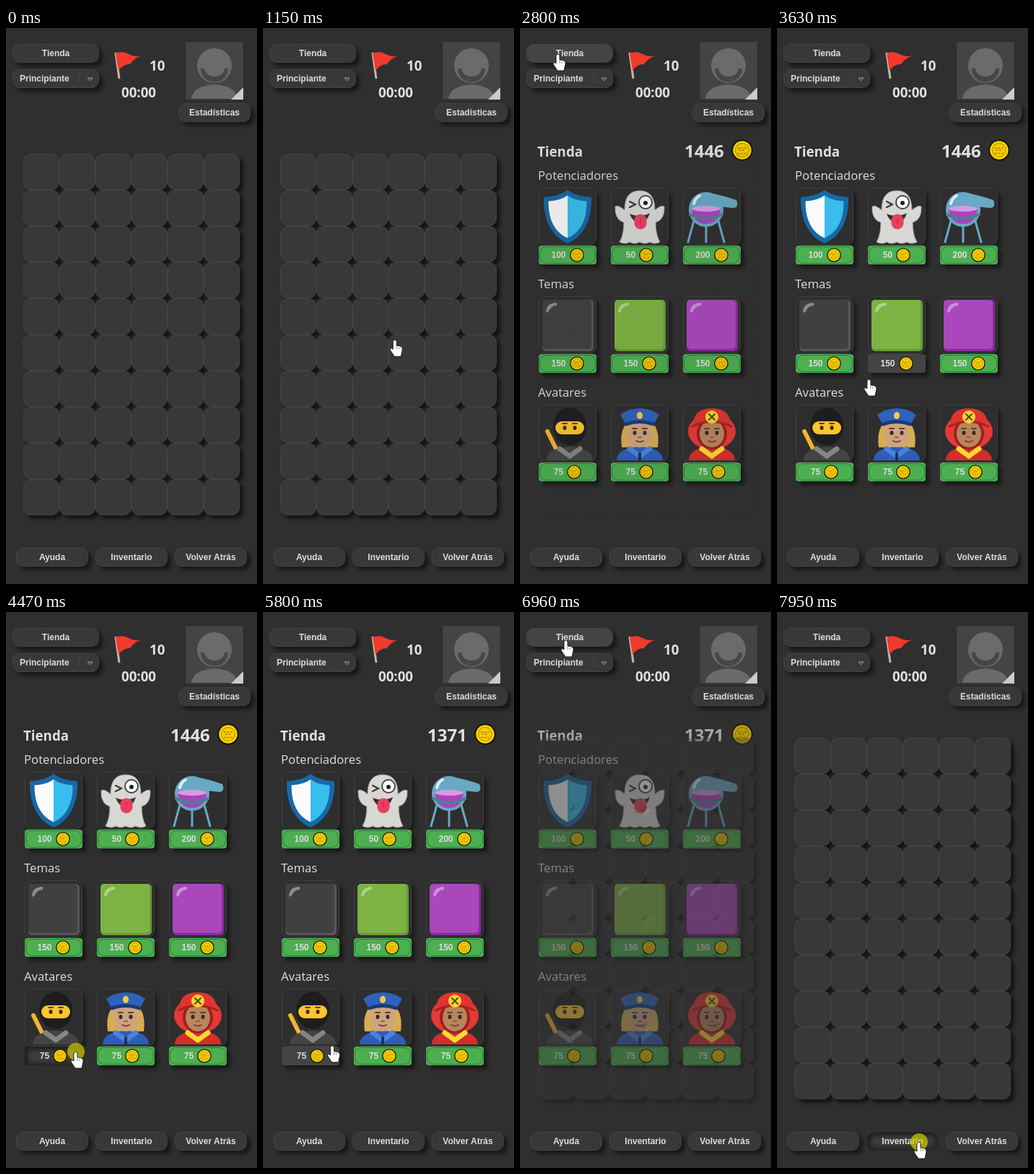
Animation, 348 px wide and 769 px high, one loop 8 s. Source, as an HTML page:

```html
<!DOCTYPE html>
<html lang="es">
<head>
<meta charset="utf-8">
<title>Buscaminas</title>
<style>
html, body { margin: 0; width: 100%; height: 100%; overflow: hidden; background: #2f2f2f; }
#stage { position: relative; width: 348px; height: 769px; overflow: hidden; background: #2f2f2f; }
#stage div, #stage > svg, .layer > svg { position: absolute; box-sizing: border-box; }
.layer, .full { left: 0; top: 0; width: 348px; height: 769px; }
.full { pointer-events: none; }
.button, .select, .price { height: 26px; font: bold 12px/24px 'Liberation Sans', Arial, sans-serif; color: #ddd; text-align: center; box-shadow: 5px 5px 5px #181818; }
.button, .select, .cell, .tile { border: 1px solid #434343; border-radius: 10px; background: #383838; }
.select { text-align: left; padding-left: 9px; }
.select svg { position: absolute; left: 0; top: 0; }
.cell { width: 50px; height: 50px; box-shadow: 5px 5px 5px #141414; }
.tile { width: 80px; height: 80px; background: #2e2e2e; border-color: #404040; box-shadow: 5px 5px 5px #1d1d1d; }
.tile svg { position: absolute; left: -1px; top: -1px; }
.price { border-radius: 4px; background: #4caf50; display: flex; justify-content: center; align-items: center; gap: 5px; }
.price::before { content: ''; position: absolute; inset: 1px; border: 1px solid #2c7d33; border-radius: 9px; }
.hover { background: #444; }
.hover::before { display: none; }
.press { background: #3d3d3d; border-color: #2a2a2a; box-shadow: inset 4px 4px 6px #1c1c1c, inset -4px -4px 6px #262626; }
text { font-family: 'Open Sans', 'Noto Sans', sans-serif; fill: #e0e0e0; }
.bold { font-weight: 700; font-size: 18.72px; }
.total { font-weight: 700; font-size: 24px; }
.title { font-size: 16.7px; }
</style>
</head>
<body>
<div id="stage">
  <svg class="full" viewBox="0 0 348 769">
    <symbol id="coin" viewBox="-10 -10 20 20">
      <circle r="9.800" fill="#17130a"/>
      <circle r="8.500" fill="#fdd800"/>
      <circle r="6.300" fill="#f8cc00" stroke="#c79f00"/>
      <path d="M-4-2H4M-3 0H3M-4 3H4" stroke="#a88400" stroke-dasharray="2 1"/>
    </symbol>
    <path d="M152 34 157 70" stroke="#c9b79c" stroke-width="3"/>
    <path d="M152 35Q162 31 170 36T188 38Q177 42 172 50 162 50 156 59Z" fill="#f03a2d"/>
    <text class="bold" x="199" y="59">10</text>
    <text class="bold" x="160" y="96">00:00</text>
    <rect x="249.500" y="19.500" width="79" height="79" fill="#444" stroke="#3c3c3c"/>
    <path d="M257 98Q259 80 289 78 319 80 321 98Z" fill="#6a6a6a"/>
    <circle cx="289" cy="52" r="24" fill="#6b6b6b"/>
    <path d="M270 56A19 19 0 0 0 308 56Z" fill="#464646"/>
    <path d="M275 56A14 11 0 0 0 303 56Z" fill="#6b6b6b"/>
    <path d="M329 82V99H312Z" fill="#c5cec8"/>
  </svg>
  <div id="shop" class="layer">
    <svg class="full" viewBox="0 0 348 769">
      <text class="bold" x="24" y="178">Tienda</text>
      <text class="total" id="total" x="228" y="179"></text>
      <use href="#coin" x="293" y="154" width="30" height="30"/>
      <text class="title" x="25" y="210">Potenciadores</text>
      <text class="title" x="25" y="360">Temas</text>
      <text class="title" x="25" y="510">Avatares</text>
    </svg>
  </div>
  <div id="board" class="layer"></div>
  <svg id="pointer" class="full" viewBox="0 0 348 769">
    <g id="cursor">
      <circle id="ring" r="12" fill="#d2cd00" opacity=".7"/>
      <path d="M-3 2Q0-2 2 2V8Q11 8 10 14L8 23H-1L-7 14Q-7 10-3 13Z" fill="#fff" stroke="#111" stroke-width=".9"/>
      <path d="M2 9v4M5 10v3" stroke="#555" stroke-width=".7"/>
    </g>
  </svg>
</div>
<script>
const $ = id => document.getElementById(id);
const stage = $('stage'), shop = $('shop'), board = $('board'), pointer = $('pointer');

// Icons are drawn around the centre of an 80 px tile; mirror() completes symmetric ones.
const path = (d, fill, extra = '') => `<path d="${d}" fill="${fill}" ${extra}/>`;
const line = (d, color, width) => path(d, 'none', `stroke="${color}" stroke-width="${width}" stroke-linecap="round"`);
const oval = (x, y, rx, ry, fill) => `<ellipse cx="${x}" cy="${y}" rx="${rx}" ry="${ry}" fill="${fill}"/>`;
const shift = (x, svg) => `<g transform="translate(${x})">${svg}</g>`;
const mirror = svg => `${svg}<g transform="scale(-1 1)">${svg}</g>`;

const shoulders = color => path('M-32 37Q-32 20 0 18 32 20 32 37', color);
const collar = color => mirror(line('M-14 21 0 31', color, 7));
const eyes = y => mirror(oval(-7, y, 2.5, 3, '#3a2a22') + line(`M-10 ${y - 6}h6`, '#5b4030', 2));
const face = skin => oval(0, 0, 17, 19, skin) + eyes(-1) +
  line('M-2 5H2', '#8d5f45', 2) + line('M-5 10Q0 13 5 10', '#7b3f35', 2);

function shield() {
  const half = 'M0-37Q-12-28-33-27C-34 0-25 26 0 37Z';
  return mirror(path(half, '#1768a6')) +
    path(half, '#fafafa', 'transform="scale(.8)"') +
    path(half, '#38bdec', 'transform="scale(-.8 .8)"');
}

function ghost() {
  const half = 'M0-36Q-21-36-21-9-30-17-34-14-35 4-22 8-22 25-28 35-20 39-14 35-7 39 0 35';
  return mirror(path(half, '#d8d7d4', 'stroke="#a5a5a5"')) +
    oval(8, -20, 10, 10, '#444') + oval(8, -20, 8, 8, '#fff') + oval(8, -19, 3, 3, '#222') +
    line('M-14-21l8 4-8 4', '#333', 2) +
    path('M-14-4Q0 2 14-5 10 8 0 8-10 8-14-4', '#333') +
    line('M1 5V9', '#e8405f', 17) + line('M1 2V10', '#b92747', 1);
}

function alembic() {
  const glass = '#69a9c4';
  return path('M-8-34Q14-30 34-23 38-13 30-12L12-14Z', glass) +
    shift(-8, mirror(line('M-17 6-25 35', glass, 3)) + line('M0 12V35', glass, 3) +
      oval(0, -10, 24, 24, glass) +
      path('M-20-11H20Q18 10 0 10-18 10-20-11', '#a944bb') +
      oval(0, -11, 20, 4, '#d79be2') +
      line('M-22-3Q0 8 22-3', '#4c8096', 4) + line('M-17-18Q-15-26-9-29', '#d8edf5', 4));
}

const theme = (side, front) => [[side, 71], [front, 68]].map(([color, size]) =>
  `<rect x="-35" y="-35" width="${size}" height="${size}" rx="5" fill="${color}"/>`).join('') +
  path('M-30-17Q-30-31-15-31V-27Q-23-27-26-19Z', '#fff', 'opacity=".4"');

const ninja = () => line('M-28-3-14 25', '#f2b431', 6) + line('M-20 26-9 20', '#777', 3) +
  shift(3, shoulders('#444') + collar('#858585') + oval(0, -10, 23, 26, '#1d1d1d') +
    line('M-11-8H11', '#fbc52f', 18) + eyes(-8));

const police = () => mirror(path('M0-20Q-30-20-25 19H0', '#d8ac55')) +
  shoulders('#2d5eb8') + face('#cea47f') + collar('#4a83dc') + line('M0 28V36', '#172f60', 4) +
  mirror(path('M0-35Q-18-34-27-26L-20-14H0', '#2e62bd')) +
  line('M-19-13Q0-20 19-13', '#193b78', 5) + oval(0, -25, 4, 5, '#f6c94b');

const firefighter = () => shoulders('#d52d2c') + oval(0, -3, 33, 25, '#e53935') +
  oval(0, 0, 21, 22, '#97221f') + face('#b9855d') + collar('#fdd835') +
  mirror(path('M0-35Q-26-35-26-11-14-18 0-18', '#e13431')) +
  line('M-27-10Q0-23 27-10', '#ad2020', 3) +
  oval(0, -23, 9, 9, '#f9d332') + mirror(line('M-4-27 4-19', '#594512', 2));

const shelves = [
  { icons: [shield(), ghost(), alembic()], costs: [100, 50, 200] },
  { icons: [theme('#575757', '#404040'), theme('#689b36', '#7cb342'), theme('#8d2aa3', '#ab47bc')], costs: [150, 150, 150] },
  { icons: [ninja(), police(), firefighter()], costs: [75, 75, 75] }
];

function box(parent, className, x, y, html = '', width = 0) {
  const el = document.createElement('div');
  el.className = className;
  el.style.left = x + 'px';
  el.style.top = y + 'px';
  if (width) el.style.width = width + 'px';
  el.innerHTML = html;
  parent.append(el);
  return { el, contains: p => p.x >= x && p.x < x + width && p.y >= y && p.y < y + 26 };
}

const prices = shelves.flatMap(({ icons, costs }, row) => icons.map((icon, column) => {
  const x = 26 + column * 100, y = 221 + row * 150;
  box(shop, 'tile', x, y, `<svg width="80" height="80" viewBox="-40 -40 80 80">${icon}</svg>`);
  return box(shop, 'price', x, y + 80, `${costs[column]}<svg width="20" height="20"><use href="#coin"/></svg>`, 80);
}));

for (let i = 0; i < 60; i++) box(board, 'cell', 24 + i % 6 * 50, 174 + Math.floor(i / 6) * 50);

const buttons = [
  box(stage, 'button', 9, 22, 'Tienda', 120),
  box(stage, 'button', 239, 104, 'Estadísticas', 100),
  ...['Ayuda', 'Inventario', 'Volver Atrás'].map((label, i) => box(stage, 'button', 14 + i * 110, 719, label, 100))
];
box(stage, 'select', 9, 57, `Principiante<svg width="118" height="24">
  ${line('M82 0Q92 1 92 12T82 24', '#434343', 1)}
  ${path('M103 11h7l-3.500 4z', '#444', 'stroke="#999"')}</svg>`, 120);
stage.append(pointer);

const outside = { x: 318, y: 758 }, shopSpot = { x: 53, y: 36 }, buySpot = { x: 97, y: 608 };
const closeSpot = { x: 64, y: 39 }, inventorySpot = { x: 197, y: 733 };
const moves = [
  { start: 740, end: 2050, from: outside, to: shopSpot, bend: -15 },
  { start: 2820, end: 4130, from: shopSpot, to: buySpot, bend: 60 },
  { start: 5795, end: 6460, from: buySpot, to: closeSpot, bend: 0 },
  { start: 7040, end: 7870, from: closeSpot, to: inventorySpot, bend: 0 }
];
const clicks = [2470, 4470, 6710, 7950], clickLength = 170, hoverDelay = 60, fadeLength = 250;
const ramp = (time, start, length) => Math.min(1, Math.max(0, (time - start) / length));

function tipAt(time) {
  const { start, end, from, to, bend } = moves.findLast(m => time >= m.start) ?? moves[0];
  const e = 1 - (1 - ramp(time, start, end - start)) ** 1.6;
  return {
    x: from.x + (to.x - from.x) * e + bend * 4 * e * (1 - e),
    y: from.y + (to.y - from.y) * e
  };
}

function render(time) {
  const shown = ramp(time, 2560, fadeLength) - ramp(time, 6880, fadeLength);
  shop.style.opacity = shown;
  board.style.opacity = 1 - shown;
  $('total').textContent = time < 4640 ? 1446 : 1446 - 75;

  const tip = tipAt(time), hoverTip = tipAt(time - hoverDelay);
  const visible = time >= moves[0].start;
  const clicking = clicks.some(start => time >= start && time < start + clickLength);
  for (const target of [...buttons, ...prices]) {
    const active = visible && target.contains(hoverTip) && (buttons.includes(target) || shown > .5);
    target.el.classList.toggle('hover', active);
    target.el.classList.toggle('press', active && clicking);
  }

  pointer.style.display = visible ? '' : 'none';
  $('cursor').setAttribute('transform', `translate(${tip.x} ${tip.y})`);
  $('ring').style.display = clicking ? '' : 'none';
}

const began = performance.now();
function tick() {
  render((performance.now() - began) % 8000);
  requestAnimationFrame(tick);
}
render(0);
requestAnimationFrame(tick);
</script>
</body>
</html>
```
